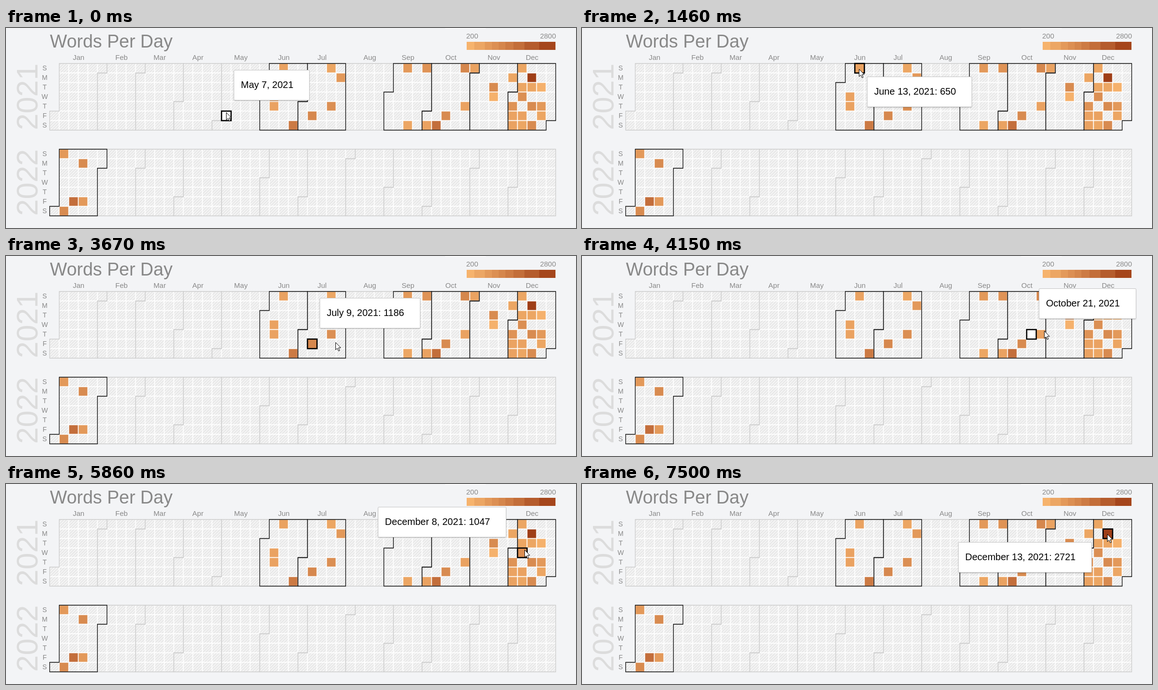
Recreate the animation shown at these times as an HTML page. Size 1194 px wide and 420 px high, loop 8 s.

```html
<!DOCTYPE html>
<html lang="en">
<head>
<meta charset="utf-8">
<title>Words Per Day</title>
<style>
html, body { margin: 0; width: 100%; height: 100%; overflow: hidden; background: #f3f4f6; }
body { position: relative; font-family: "Liberation Sans", Arial, sans-serif; }
svg { position: absolute; left: 0; top: 0; }
text { fill: #888; font-size: 15px; }
.mid { text-anchor: middle; }
#tip {
  position: absolute; box-sizing: border-box; height: 64px; padding: 0 33px 0 14px;
  border: 1px solid #c4c4c4; border-radius: 2px; background: #fff;
  box-shadow: 0 2px 3px -1px rgba(0, 0, 0, .25);
  font-size: 20px; line-height: 60px; white-space: nowrap; color: #000;
}
</style>
</head>
<body>
<svg id="chart" width="1194" height="420">
  <defs>
    <pattern id="hatch" width="6" height="6" patternUnits="userSpaceOnUse">
      <path d="M0 0H6V6H0Z" fill="#f8f8f8"/>
      <path d="M-1 1L1 -1M-1 7L7 -1M5 7L7 5" stroke="#e4e4e4" stroke-width="2"/>
    </pattern>
  </defs>
</svg>
<div id="tip"></div>
<svg id="cursor" width="14" height="22" style="overflow:visible">
  <path d="M.5 .5V16L4 12.8L6.6 18.5L9 17.4L6.5 11.8H11.3Z" fill="#fff" stroke="#000"/>
</svg>
<script>
const LEFT = 92, CELL = 20, COLS = 53, STEP = 80;
const MONTHS = "Jan Feb Mar Apr May Jun Jul Aug Sep Oct Nov Dec".split(" ");

// words: { count: slots }, where slot = column * 7 + weekday
const YEARS = [
  { year: 2021, top: 74, first: 5, words: {
    340: [325, 359], 580: [203, 265, 337, 343, 345, 349, 352, 362], 627: [341],
    650: [164, 165, 168, 279, 305, 308, 342, 348], 840: [211, 259, 361], 960: [273, 340],
    1047: [207, 346], 1130: [292, 324, 354, 356], 1186: [194], 1220: [301],
    1480: [181], 1720: [286], 2721: [351] } },
  { year: 2022, top: 254, first: 6, words: { 840: [7, 26], 1130: [13, 22], 1720: [19] } }
];
for (const y of YEARS) {
  const bySlot = {};
  for (const count in y.words) for (const s of y.words[count]) bySlot[s] = +count;
  y.words = bySlot;
}

// pointer bursts: start ms, number of steps, evenly timed waypoints
const REST = [461, 177];
const MOVES = [
  [80, 3, [461, 86], [459, 66], [459, 60]],
  [740, 10, [534, 76], [541, 80], [556, 83], [575, 85], [580, 86]],
  [2120, 7, [582, 98], [582, 110], [584, 160], [588, 182], [595, 197], [599, 200], [601, 202]],
  [2930, 4, [640, 182]],
  [3670, 12, [740, 179], [840, 176], [935, 164], [1000, 150], [1056, 164], [1071, 187]],
  [4720, 4, [1071, 190], [1072, 193], [1073, 200], [1073, 205]],
  [5130, 3, [1080, 207]],
  [5460, 7, [1086, 137]],
  [6110, 6, [1099, 121]],
  [6760, 4, [1100, 105]]
];

const chart = document.getElementById("chart");
const tip = document.getElementById("tip");
const pointer = document.getElementById("cursor");

function add(tag, attrs, label) {
  const el = document.createElementNS("http://www.w3.org/2000/svg", tag);
  for (const key in attrs) el.setAttribute(key, attrs[key]);
  if (label) el.textContent = label;
  return chart.appendChild(el);
}

const mix = (a, b, k) => a.map((v, i) => v + (b[i] - v) * k);

function shade(words) {
  return `rgb(${mix([250, 184, 113], [156, 58, 20], (words - 200) / 2600).map(Math.round)})`;
}

function monthOutline(from, to) {
  const a = Math.floor(from / 7), b = Math.floor((to - 1) / 7);
  const r = from % 7, q = (to - 1) % 7 + 1;
  return [[a + 1, 0], [b + 1, 0], [b + 1, q], [b, q], [b, 7], [a, 7], [a, r], [a + 1, r]]
    .map(p => p.map(v => v * CELL)).join(" ");
}

function drawYear({ year, top, first, words }) {
  const place = `translate(${LEFT - .5} ${top + .5})`;
  for (let s = first; s < first + 365; s++)
    add("rect", { x: Math.floor(s / 7) * CELL, y: s % 7 * CELL, width: CELL, height: CELL, transform: place,
      fill: words[s] ? shade(words[s]) : "url(#hatch)", stroke: "#fff", "stroke-width": 1.6 });

  const outlines = MONTHS.map((_, m) => {
    const slot = n => first + Math.round((Date.UTC(year, n, 1) - Date.UTC(year, 0, 1)) / 864e5);
    const from = slot(m), to = slot(m + 1);
    return { points: monthOutline(from, to), busy: Object.keys(words).some(s => s >= from && s < to) };
  });
  for (const busy of [false, true])
    for (const o of outlines.filter(o => o.busy === busy))
      add("polygon", { points: o.points, transform: place, fill: "none",
        stroke: busy ? "#000" : "#c8c8c8", "stroke-width": 1.3 });

  [..."SMTWTFS"].forEach((d, r) =>
    add("text", { x: 81, y: top + 15 + r * CELL, class: "mid", style: "font-size:14px" }, d));
  add("text", { transform: `translate(66 ${top + 70.5}) rotate(-90)`, class: "mid",
    style: "font-size:63px;fill:#dcdcdc" }, String(year));
}

function drawLegend() {
  const edges = [965, 981, 1003, 1018, 1032, 1046, 1063, 1086, 1117, 1151];
  edges.slice(1).forEach((end, i) => {
    const x = edges[i], middle = (x + end) / 2;
    add("rect", { x, y: 29, width: end - x, height: 17, fill: shade(200 + 2600 * (middle - 965) / 186) });
  });
  add("text", { x: 964, y: 22 }, "200");
  add("text", { x: 1152, y: 22, "text-anchor": "end" }, "2800");
}

add("rect", { x: 920, width: 85, height: 1.5, fill: "#fff" });
add("text", { x: 92, y: 41, style: "font-size:38px" }, "Words Per Day");
const labelX = [152, 242, 322, 402, 492, 582, 662, 762, 842, 932, 1022, 1102];
MONTHS.forEach((m, i) => add("text", { x: labelX[i], y: 67, class: "mid" }, m));
drawLegend();
YEARS.forEach(drawYear);
const focus = add("rect", { width: CELL, height: CELL, stroke: "#000", "stroke-width": 2.6 });

// pointer position, held for each step; single-target bursts ease out
function pointerAt(t) {
  let from = REST;
  for (const [start, steps, ...points] of MOVES) {
    if (t < start) break;
    const n = points.length, path = [from, ...points];
    let k = Math.min(1, (Math.floor((t - start) / STEP) + 1) / steps);
    if (n === 1) k *= 2 - k;
    const i = Math.min(n - 1, Math.floor(k * n + 1e-9));
    from = mix(path[i], path[i + 1], k * n - i);
  }
  return from;
}

function showDay([px, py]) {
  const { year, top, first, words } = YEARS[0];
  const col = Math.floor((px - LEFT) / CELL), row = Math.floor((py - top) / CELL);
  const inside = col >= 0 && col < COLS && row >= 0 && row < 7;
  focus.style.display = tip.style.display = inside ? "" : "none";
  if (!inside) return;

  const slot = col * 7 + row, x = LEFT + col * CELL, y = top + row * CELL;
  focus.setAttribute("x", x - .5);
  focus.setAttribute("y", y + .5);
  focus.setAttribute("fill", words[slot] ? shade(words[slot]) : "#fff");

  const date = new Date(year, 0, 1 + slot - first)
    .toLocaleDateString("en-US", { year: "numeric", month: "long", day: "numeric" });
  tip.textContent = words[slot] ? `${date}: ${words[slot]}` : date;
  const flip = x > 1000;
  tip.style.left = flip ? "auto" : x + 25 + "px";
  tip.style.right = flip ? 1194 - x + 24 + "px" : "auto";
  tip.style.top = (row < 2 ? y + 28 : y - 86) + "px";
}

function draw(now) {
  const t = now % 8000, [x, y] = pointerAt(t);
  pointer.style.transform = `translate(${Math.round(x)}px, ${Math.round(y)}px)`;
  showDay(pointerAt(t - STEP)); // hover trails the pointer by one step
}

const began = performance.now();
function tick() {
  draw(performance.now() - began);
  requestAnimationFrame(tick);
}
tick();
</script>
</body>
</html>
```
